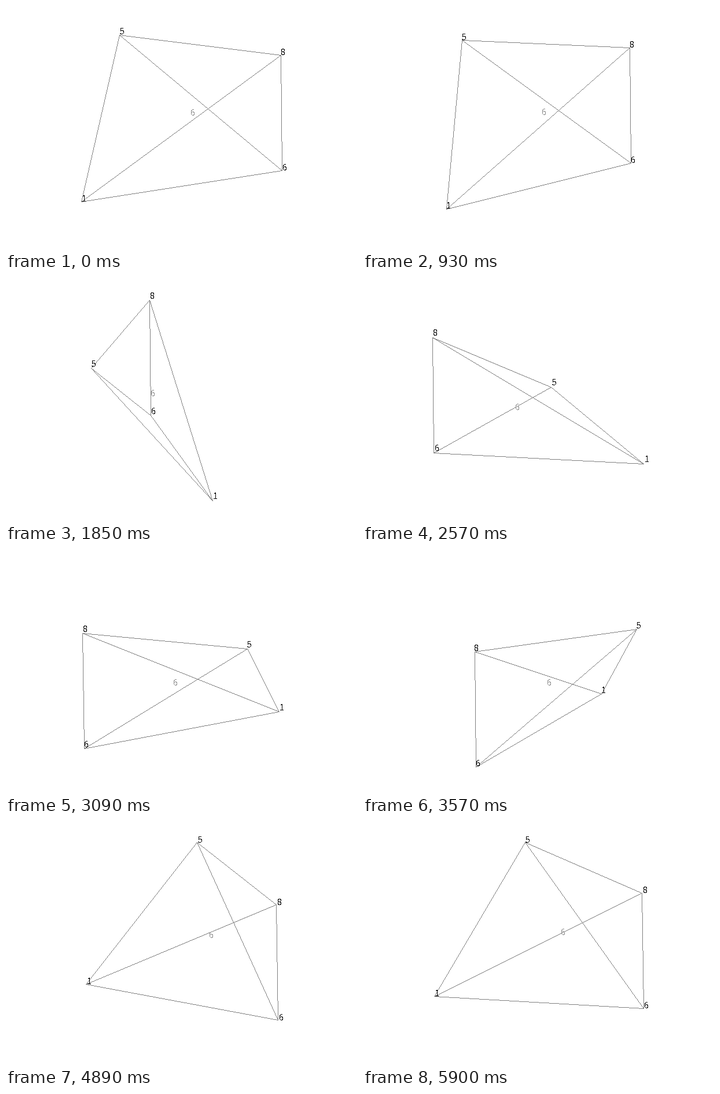
A matplotlib script for the animation above (7.13 s loop, 607 by 423 pixels).

```python
import numpy as np
import matplotlib.pyplot as plt
from matplotlib.animation import FuncAnimation

plt.rcParams["text.hinting_factor"] = 1

W, H, DPI = 607, 423, 64
PX = 72 / DPI
LOOP, TICK = 7130, 10

CENTER = np.array([302.4, 212.1])
AXIS = np.array([1.2, 100.0])      # half height of the prism, as seen on screen
RX, RY, ROLL = 183.3, 77.5, 0.0125

# label, angle on the ring, side of the axis (-1 top, 1 bottom)
CORNERS = [("1", 180, 1), ("5", 106, -1), ("8", 0, -1), ("6", 0, 1)]
EDGES = [(0, 1), (1, 2), (2, 0), (1, 3), (3, 0), (2, 3)]

# turn of the solid in degrees against the step count
KEY_STEP = np.array([0, 8, 16, 31, 34, 49, 52, 70, 74, 88, 106, 107])
KEY_TURN = np.array([18.6, 29.1, 52.2, 106.6, 117, 171.3, 180,
                     221.5, 233.4, 276, 332.3, 334.6])
SLOPE = np.gradient(KEY_TURN, KEY_STEP)
SLOPE[0] = 0.6
END_TURN = 350.45


def step_at(ms):
    """Each turn opens with one long step, then runs at 40 ms a step."""
    if ms < 550:
        return 0
    if ms < 5440:
        return 1 if ms < 690 else min(107, 2 + (ms - 690) // 40)
    return 108 if ms < 5580 else min(117, 109 + (ms - 5580) // 40)


def turn_at(step):
    if step > 107:
        s = (step - 107) / 10
        return KEY_TURN[-1] + (END_TURN - KEY_TURN[-1]) * s * s * (3 - 2 * s)
    i = min(np.searchsorted(KEY_STEP, step, side="right") - 1, len(KEY_STEP) - 2)
    gap = KEY_STEP[i + 1] - KEY_STEP[i]
    s = (step - KEY_STEP[i]) / gap
    return ((1 + 2 * s) * (1 - s) ** 2 * KEY_TURN[i]
            + s * (1 - s) ** 2 * gap * SLOPE[i]
            + s * s * (3 - 2 * s) * KEY_TURN[i + 1]
            + s * s * (s - 1) * gap * SLOPE[i + 1])


def project(turn, angle, side):
    a = np.radians(turn + angle)
    u, v = RX * np.cos(a), RY * np.sin(a)
    return CENTER + side * AXIS + (u - ROLL * v, -v - ROLL * u)


def label_shift(turn):
    dx = 1.25 + 1.25 * np.cos(2 * np.radians(turn - 148))
    dy = -1.5 - 1.5 * np.cos(np.radians(turn - 140))
    return np.array([dx, dy])


def pixel_line(p, q):
    """Pixels of a one pixel wide line without smoothing."""
    p, q = np.round(p), np.round(q)
    n = int(np.abs(q - p).max()) + 1
    return np.floor(np.linspace(p, q, n) + 0.5)


fig = plt.figure(figsize=(W / DPI, H / DPI), dpi=DPI, facecolor="white")
ax = fig.add_axes([0, 0, 1, 1])
ax.set_xlim(0, W)
ax.set_ylim(H, 0)
ax.axis("off")

edges, = ax.plot([], [], ",", color="#808080", antialiased=False)


def make_label(text, color):
    return ax.text(0, 0, text, color=color, family="Noto Sans CJK JP",
                   size=14 * PX, ha="left", va="baseline",
                   antialiased=False, zorder=3)


labels = [make_label(name, "black") for name, _, _ in CORNERS]
middle = make_label("6", "#909090")
NUDGE = np.array([-0.5, 0.5])


def draw(i):
    turn = turn_at(step_at(i * TICK))
    pts = np.array([project(turn, a, side) for _, a, side in CORNERS])
    dots = np.vstack([pixel_line(pts[a], pts[b]) for a, b in EDGES])
    edges.set_data(dots[:, 0], dots[:, 1] + 1)   # pixel markers sit above their point
    for label, p in zip(labels, pts + label_shift(turn)):
        label.set_position(np.round(p + NUDGE))
    middle.set_position(np.round(pts.mean(axis=0) + NUDGE))
    return [edges, middle, *labels]


anim = FuncAnimation(fig, draw, frames=LOOP // TICK, interval=TICK,
                     repeat=True, repeat_delay=0, blit=False)
plt.show()
```
